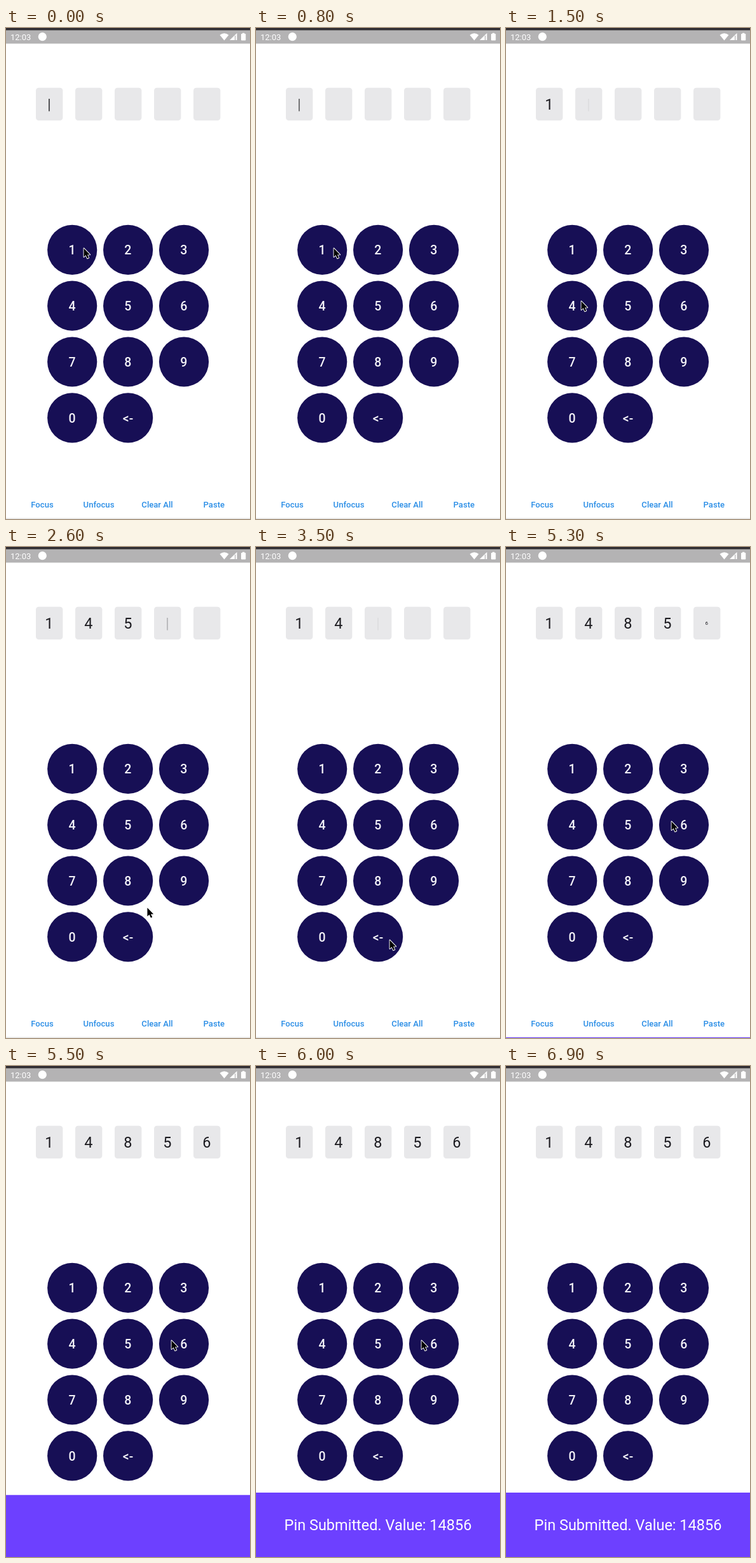
These frames come from a looping animation (384x770 px, 7000 ms). An HTML page with a canvas:

```html
<!DOCTYPE html>
<html lang="en">
<head>
<meta charset="utf-8">
<title>Pin entry</title>
<style>
  html, body { margin: 0; width: 100%; height: 100%; overflow: hidden; background: #fff; }
  canvas { display: block; width: 384px; height: 770px; }
</style>
</head>
<body>
<canvas id="stage" width="384" height="770"></canvas>
<script>
const ctx = document.getElementById('stage').getContext('2d');
const LOOP = 7000;

// [time, resulting pin]
const ENTRIES = [
  [0, ''], [950, '1'], [1750, '14'], [2250, '145'],
  [3150, '14'], [4050, '148'], [4650, '1485'], [5250, '14856']
];

// [time, x, y] of the pointer tip
const POINTER = [
  [0, 122, 345], [1000, 122, 345], [1400, 118, 428], [1800, 118, 428],
  [2100, 195, 432], [2300, 195, 432], [2600, 222, 565], [2800, 210, 616],
  [3600, 210, 616], [3900, 194, 522], [4100, 194, 522], [4400, 193, 431],
  [4750, 193, 431], [5050, 260, 430], [6320, 260, 430], [6500, 25, 426]
];
const POINTER_GONE = 6560;

const clamp = v => Math.max(0, Math.min(1, v));
const easeOut = p => 1 - (1 - clamp(p)) ** 3;

function rect(x, y, w, h, color, radius = 0) {
  ctx.fillStyle = color;
  ctx.beginPath();
  ctx.roundRect(x, y, w, h, radius);
  ctx.fill();
}

function circle(x, y, r, color) {
  ctx.fillStyle = color;
  ctx.beginPath();
  ctx.arc(x, y, r, 0, Math.PI * 2);
  ctx.fill();
}

function shape(path, color) {
  ctx.fillStyle = color;
  ctx.fill(new Path2D(path));
}

function text(str, x, y, size, color, weight = 400, align = 'center') {
  ctx.font = `${weight} ${size}px Roboto, sans-serif`;
  ctx.textAlign = align;
  ctx.fillStyle = color;
  ctx.fillText(str, x, y);
}

function drawStatusBar() {
  rect(0, 0, 384, 24.5, '#b4b3b4');
  rect(0, 0, 384, 3.5, '#302d31');
  text('12:03', 7, 18.5, 13, '#fff', 400, 'left');
  circle(57.3, 13.7, 6.6, '#fff');
  shape('M336.5 11 Q343.5 5.5 350.5 11 L343.5 19.5Z', '#fff');
  shape('M363.5 8 V19 H352Z', '#fff');
  rect(360, 12, 1.3, 7, '#b4b3b4');
  rect(370, 9, 7.3, 10.5, '#fff', 1);
  rect(372, 7.8, 3.3, 2, '#fff');
}

function drawPin(t) {
  const step = ENTRIES.findLastIndex(([time]) => time <= t);
  const [since, pin] = ENTRIES[step];
  const typed = step > 0 && pin.length > ENTRIES[step - 1][1].length;

  for (let i = 0; i < 5; i++) {
    const left = 47 + i * 62;
    rect(left, 93.8, 42.4, 51.2, '#e8e8ea', 4.5);
    if (i < pin.length) {
      const scale = typed && i === pin.length - 1 ? clamp((t - since) / 150) : 1;
      ctx.save();
      ctx.translate(left + 20.8, 119.5);
      ctx.scale(scale, scale);
      text(pin[i], 0, 8.2, 23.5, '#1c1b20');
      ctx.restore();
    } else if (i === pin.length) {
      const wave = Math.abs(1 - (t % 1000) / 500);
      ctx.globalAlpha = Math.min(1, 0.06 + 1.2 * wave);
      rect(left + 20.2, 111, 1.5, 19.5, '#202024');
      ctx.globalAlpha = 1;
    }
  }
}

function drawKeypad() {
  [...'1234567890', '<-'].forEach((label, i) => {
    const x = 104.2 + (i % 3) * 87.9;
    const y = 347.9 + Math.floor(i / 3) * 87.8;
    circle(x, y, 39.1, '#170f55');
    text(label, x - 0.2, y + 7.2, 19.5, '#f4f3f8', 500);
  });
}

function drawActions() {
  [['Focus', 57], ['Unfocus', 146], ['Clear All', 238], ['Paste', 327.3]]
    .forEach(([label, x]) => text(label, x, 752.3, 13.1, '#2b8ee6', 500));
  rect(0, 768.5, 384, 1.5, '#e6e6e6');
}

function drawSnackbar(t) {
  const height = 101 * easeOut((t - 5300) / 300);
  if (height <= 0) return;
  const top = 770 - height;
  rect(0, top, 384, height, '#6d40ff');
  ctx.globalAlpha = clamp((t - 5500) / 200);
  text('Pin Submitted. Value: 14856', 192, top + 59, 23.5, '#fff');
  ctx.globalAlpha = 1;
}

function drawPointer(t) {
  if (t >= POINTER_GONE) return;
  const i = POINTER.findLastIndex(([time]) => time <= t);
  const [t0, x0, y0] = POINTER[i];
  const [t1, x1, y1] = POINTER[i + 1] || [t0 + 1, x0, y0];
  const p = clamp((t - t0) / (t1 - t0));
  ctx.save();
  ctx.translate(x0 + (x1 - x0) * p, y0 + (y1 - y0) * p);
  const arrow = new Path2D('M0.5 0.5 V14 L3.6 11.2 L6 16.3 L8.3 15.3 L6 10.4 H10.2Z');
  ctx.lineWidth = 1.8;
  ctx.lineJoin = 'round';
  ctx.strokeStyle = '#fff';
  ctx.stroke(arrow);
  ctx.fillStyle = '#000';
  ctx.fill(arrow);
  ctx.restore();
}

function draw(now) {
  const t = now % LOOP;
  rect(0, 0, 384, 770, '#fff');
  drawStatusBar();
  drawPin(t);
  drawKeypad();
  drawActions();
  drawSnackbar(t);
  drawPointer(t);
}

const start = performance.now();
function tick() {
  draw(performance.now() - start);
  requestAnimationFrame(tick);
}
tick();
</script>
</body>
</html>
```
